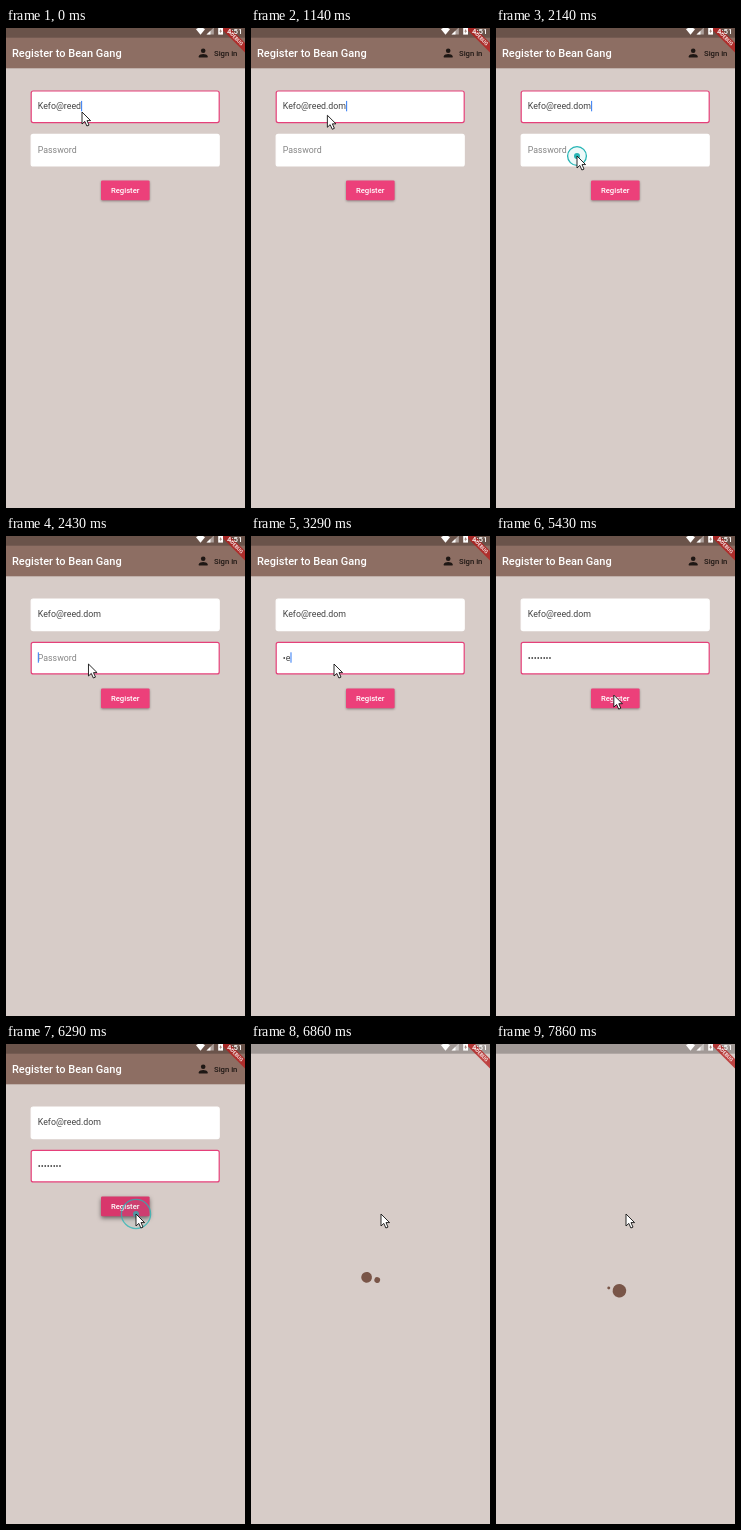
An HTML page that plays this animation: 239 by 480 pixels, repeating every 8000 ms.

```html
<!DOCTYPE html>
<html lang="en">
<head>
<meta charset="utf-8">
<title>Register</title>
<style>
  html, body { margin: 0; width: 100%; height: 100%; overflow: hidden; background: #d7ccc8; }
  svg { display: block; width: 100%; height: 100%; font-family: Roboto, sans-serif; }
  .input { font-size: 8.8px; fill: #444; }
  .hint { fill: #858585; }
  .strong { font-weight: 500; }
  .field { fill: #fff; stroke: #fff; stroke-width: 1.2; }
  .focused { stroke: #e5407a; }
  .caret { fill: #4285f4; }
  .button { fill: #ec407a; filter: drop-shadow(0 1px 1px rgba(0, 0, 0, .35)); }
  .pressed { fill: #d8376c; filter: drop-shadow(0 2px 2px rgba(0, 0, 0, .5)); }
  .loader { fill: #795548; }
</style>
</head>
<body>
<svg viewBox="0 0 239 480">
  <rect width="239" height="480" fill="#d7ccc8"/>

  <g id="form">
    <rect width="239" height="40.3" fill="#8d6e63"/>
    <text class="strong" x="6" y="29" font-size="11" fill="#fff">Register to Bean Gang</text>
    <g fill="#1e1714">
      <circle cx="197.2" cy="22.7" r="2.3"/>
      <path d="M192.8 29.4V28.2C192.8 26.6 195.6 25.9 197.2 25.9S201.6 26.6 201.6 28.2V29.4Z"/>
      <text class="strong" x="208" y="27.8" font-size="7.7">Sign in</text>
    </g>
    <rect id="emailBox" class="field" x="25.2" y="63" width="188" height="31.6" rx="2"/>
    <rect id="passBox" class="field" x="25.2" y="106.3" width="188" height="31.6" rx="2"/>
    <text id="email" class="input" x="31.8" y="81"></text>
    <text id="hint" class="input hint" x="31.8" y="124.5">Password</text>
    <text id="pass" class="input" x="31.8" y="124.5"></text>
    <rect id="caret" class="caret" width="1.1" height="10.4"/>
    <rect id="button" class="button" x="95" y="152.4" width="48.6" height="19.8" rx="1.2"/>
    <text class="strong" x="119.2" y="165" font-size="7.7" fill="#fff" text-anchor="middle">Register</text>
  </g>

  <g id="loader" class="loader">
    <circle id="dotTop" cx="-5.5" cy="-5.5"/>
    <circle id="dotBottom" cx="-5.5" cy="5.5"/>
  </g>

  <rect width="239" height="9.7" fill="#000" opacity=".25"/>
  <path d="M214.5 0H224L239 15V24.5Z" fill="#b71c1c" opacity=".78"/>
  <text class="strong" transform="translate(229.6 12.2) rotate(45)" font-size="5" font-weight="700" fill="#fff" text-anchor="middle">DEBUG</text>
  <g fill="#fff">
    <path d="M190 1.2Q194.5 -2.2 199 1.2L194.5 6.8Z"/>
    <path d="M200.5 6.6L207.8 -.6V6.6Z" opacity=".45"/>
    <path d="M200.5 6.6L204.5 2.7V6.6Z"/>
    <path d="M212.2 -.5H217V6.6H212.2Z"/>
    <path d="M215 .8L213.3 3.6H214.5L214.2 5.6 216 2.8H214.8Z" fill="#8d6e63"/>
    <text class="strong" x="221" y="6.2" font-size="7.8">4:51</text>
  </g>

  <g id="click" fill="#26b5b5" stroke="#26b5b5">
    <circle id="ring" fill-opacity=".08" stroke-width="1.3"/>
    <circle id="core" r="3" stroke="none"/>
  </g>
  <path id="mouse" d="M0 0V12L2.8 9.4 4.9 14 7 13.1 5 8.6H8.6Z" fill="#fff" stroke="#111" stroke-width=".9" stroke-linejoin="round"/>
</svg>
<script>
const LOOP = 8000, STEP = 1000 / 7;
const LOADER_START = 6275, LOADER_STEP = 45;
const FOCUS_STEP = 17;
const EMAIL = 'Kefo@reed.dom', SECRET = 'test123!';
const SECRET_STEPS = [21, 23, 24, 25, 27, 28, 29, 31];
const MASK_STEP = 34;
const CLICKS = [{ at: 15, x: 81, y: 128 }, { at: 43, x: 130, y: 170 }];
// Pointer stops: step, x, y
const PATH = [[7, 76, 84], [13, 81, 128], [15, 81, 128], [18, 83, 128], [34, 83, 128], [40, 130, 170]];

const el = Object.fromEntries([...document.querySelectorAll('[id]')].map(e => [e.id, e]));
const set = (node, attrs) => { for (const k in attrs) node.setAttribute(k, attrs[k]); };
const show = (node, on) => set(node, { visibility: on ? 'visible' : 'hidden' });
const smooth = u => u * u * (3 - 2 * u);

// cubic-bezier(.42, 0, .58, 1)
function easeInOut(x) {
  let lo = 0, hi = 1;
  for (let i = 0; i < 20; i++) {
    const u = (lo + hi) / 2, v = 1 - u;
    if (1.26 * v * v * u + 1.74 * v * u * u + u ** 3 < x) lo = u; else hi = u;
  }
  return smooth(lo);
}

function pointer(n) {
  const i = PATH.findIndex(p => p[0] >= n);
  if (i === 0) return PATH[0].slice(1);
  if (i < 0) return PATH.at(-1).slice(1);
  const [n0, x0, y0] = PATH[i - 1], [n1, x1, y1] = PATH[i];
  const u = smooth((n - n0) / (n1 - n0));
  return [x0 + (x1 - x0) * u, y0 + (y1 - y0) * u];
}

function drawForm(n) {
  const onPass = n >= FOCUS_STEP;
  const typed = SECRET_STEPS.filter(s => s <= n).length;
  const masked = n >= MASK_STEP ? typed : Math.max(typed - 1, 0);
  el.email.textContent = EMAIL.slice(0, 9 + Math.min(n, 4));
  el.pass.textContent = '•'.repeat(masked) + SECRET.slice(masked, typed);
  show(el.hint, typed === 0);
  el.emailBox.classList.toggle('focused', !onPass);
  el.passBox.classList.toggle('focused', onPass);
  el.button.classList.toggle('pressed', n >= CLICKS[1].at);

  const active = onPass ? el.pass : el.email;
  const width = active.textContent ? active.getComputedTextLength() : 0;
  set(el.caret, { x: 31.8 + width, y: onPass ? 116.3 : 72.9 });
  const blinkOff = (n >= 36 && n < 40) || n >= CLICKS[1].at;
  show(el.caret, !blinkOff);
}

function drawLoader(n) {
  const phase = (n * STEP - LOADER_START) / 2000;
  const size = Math.abs(2 * easeInOut(phase) - 1);
  set(el.loader, { transform: `translate(119.5 240) rotate(${360 * phase})` });
  set(el.dotTop, { r: 8.25 * (1 - size) });
  set(el.dotBottom, { r: 8.25 * size });
}

function drawClick(n) {
  const hit = CLICKS.find(c => n >= c.at && n < c.at + 2);
  show(el.click, hit);
  if (!hit) return;
  const age = n - hit.at;
  set(el.click, { transform: `translate(${hit.x} ${hit.y})`, opacity: age ? .75 : 1 });
  set(el.ring, { r: age ? 14.6 : 9.4 });
}

let last = -1;
function frame(now) {
  const n = Math.floor((now % LOOP + 3.5) / STEP) % 56;
  if (n !== last) {
    last = n;
    const loading = n >= LOADER_STEP;
    set(el.form, { display: loading ? 'none' : 'inline' });
    set(el.loader, { display: loading ? 'inline' : 'none' });
    if (loading) drawLoader(n); else drawForm(n);
    drawClick(n);
    set(el.mouse, { transform: `translate(${pointer(n)})` });
  }
  requestAnimationFrame(frame);
}
frame(performance.now());
</script>
</body>
</html>
```
